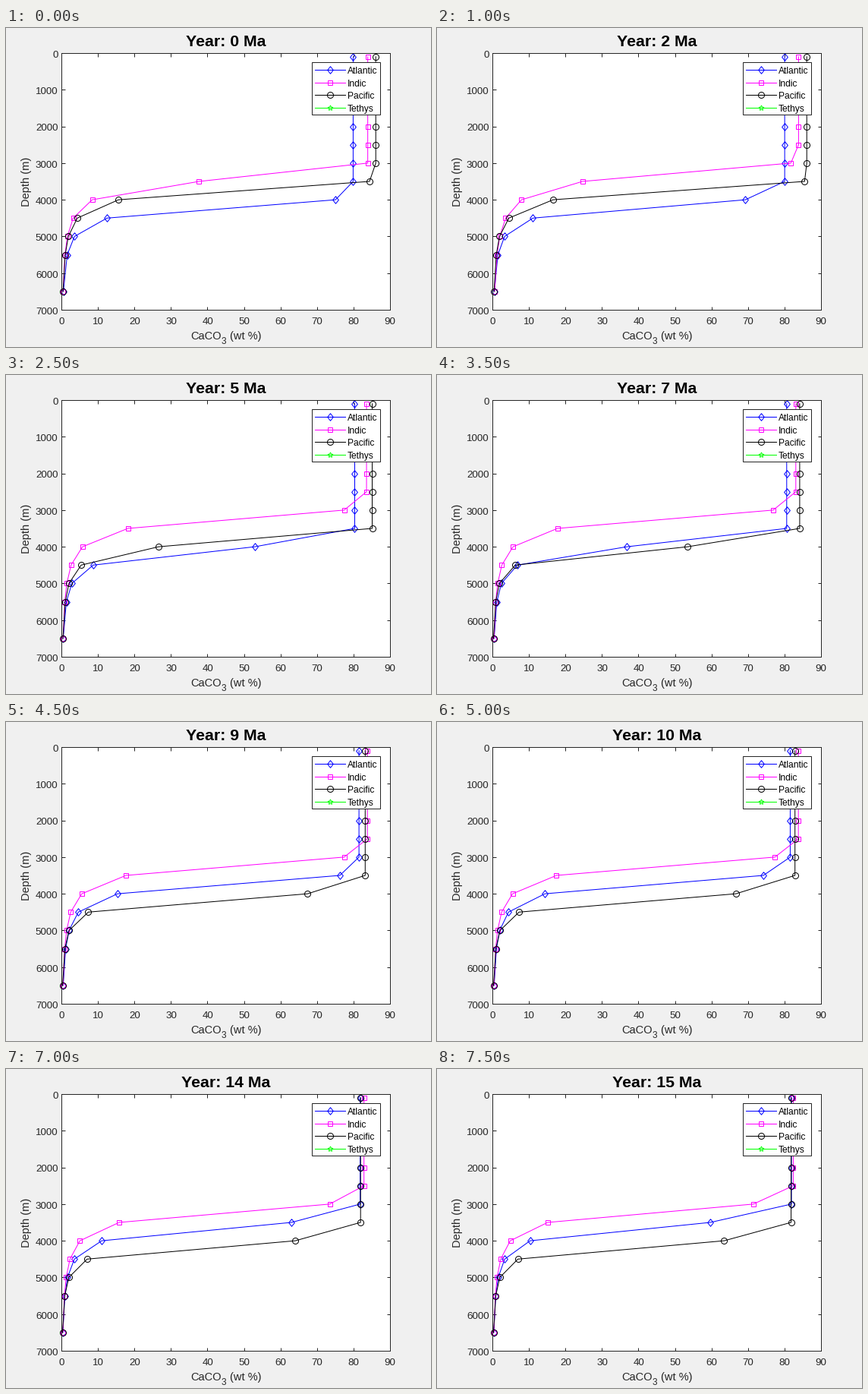
A matplotlib script that plays this animation: 560 px wide and 420 px high, repeating every 8 s.

```python
import numpy as np
import matplotlib.pyplot as plt
from matplotlib.animation import FuncAnimation
from matplotlib.lines import Line2D
from matplotlib.patches import Rectangle
from matplotlib.transforms import Affine2D

W, H, DPI = 560, 420, 100
PX = 72 / DPI                       # one pixel in points
LEFT, RIGHT, TOP, BOTTOM = 73, 506, 33, 371
INK = "#262626"
DIAMOND = [(0, 1), (0.8, 0), (0, -1), (-0.8, 0), (0, 1)]

plt.rcParams["font.family"] = "Liberation Sans"

DEPTH = np.array([100, *range(2000, 5501, 500), 6500])

# Each basin has three tracks of {year: value}, linear in between:
# shelf content (wt %), depth where dissolution sets in (m), its depth scale (m)
ATLANTIC = dict(
    shelf={0: 79.9, 4: 80.2, 7: 80.6, 9: 81.5, 15: 81.9},
    onset={0: 3923, 4: 3847, 7: 3710, 9: 3410, 15: 3320},
    scale={0: 268, 7: 268, 9: 304, 15: 282},
)
INDIC = dict(
    shelf={0: 83.9, 4: 83.8, 7: 83.1, 9: 83.8, 12: 83.8, 15: 82.4},
    onset={0: 3160, 2: 2927, 4: 2893, 12: 2893, 15: 2862},
    scale={0: 310, 2: 385, 4: 341, 15: 324},
)
PACIFIC = dict(
    shelf={0: 86.1, 2: 86.1, 4: 85.6, 9: 83.2, 12: 82.2, 15: 81.8},
    onset={0: 3453, 2: 3471, 4: 3536, 7: 3836, 9: 3891, 15: 3880},
    scale={0: 276, 4: 276, 7: 211, 15: 211},
)

# name, colour, marker, marker size in pixels, tracks
SERIES = [
    ("Atlantic", "#0000ff", DIAMOND, 9.6, ATLANTIC),
    ("Indic", "#ff00ff", "s", 6, INDIC),
    ("Pacific", "#000000", "o", 8, PACIFIC),
    ("Tethys", "#00ff00", (5, 1, 0), 7, None),
]


def profile(tracks, year):
    """Carbonate content: constant on the shelf, power-law decay below the onset."""
    shelf, onset, scale = (np.interp(year, list(tracks[k]), list(tracks[k].values()))
                           for k in ("shelf", "onset", "scale"))
    below = np.maximum(DEPTH - onset, 0) / scale
    return shelf / (1 + below ** 2.2)


fig = plt.figure(figsize=(W / DPI, H / DPI), dpi=DPI, facecolor="#f0f0f0")
pixels = Affine2D().scale(1 / W, -1 / H).translate(0, 1) + fig.transFigure


def label(x, y, s, size, ha="center", color=INK, **kw):
    return fig.text(x, y, s, transform=pixels, fontsize=size * PX, ha=ha,
                    va="baseline", color=color, **kw)


def style(color, marker, size):
    return dict(color=color, lw=PX, marker=marker, ms=size * PX, mew=PX,
                mfc="none", mec=color)


ax = fig.add_axes([LEFT / W, 1 - BOTTOM / H, (RIGHT - LEFT) / W, (BOTTOM - TOP) / H])
ax.set(xlim=(0, 90), ylim=(7000, 0), xticks=range(0, 91, 10),
       yticks=range(0, 7001, 1000))
ax.tick_params(direction="in", length=4.5 * PX, width=PX, color=INK, top=True,
               right=True, labelbottom=False, labelleft=False)
for spine in ax.spines.values():
    spine.set(linewidth=PX, edgecolor=INK)

for v in range(0, 91, 10):
    label(LEFT + 0.3 + v * (RIGHT - LEFT) / 90, 390, str(v), 13.33)
for v in range(0, 7001, 1000):
    label(68.5, TOP + 5.8 + v * (BOTTOM - TOP) / 7000, str(v), 13.33, "right")

label(284, 410, "CaCO", 14.67, "right")
label(284, 416.5, "3", 11.73, "left")
label(294.6, 410, "(wt %)", 14.67, "left")
label(30.5, 202, "Depth (m)", 14.67, rotation=90, rotation_mode="anchor")
title = label(289.5, 24, "", 21.33, color="black", weight="bold")

# Legend
fig.add_artist(Rectangle((403, 45), 90, 69, transform=pixels, fc="white",
                         ec=INK, lw=PX, zorder=1))
curves = []
for k, (name, color, marker, size, tracks) in enumerate(SERIES):
    y = 55 + 16.6 * k
    look = style(color, marker, size)
    fig.add_artist(Line2D([407, 447], [y, y], transform=pixels, **{**look, "marker": ""}))
    fig.add_artist(Line2D([427], [y], transform=pixels, **look))
    label(450, y + 5, name, 12, "left", "black")
    if tracks:
        line, = ax.plot([], [], clip_on=False, **look)
        curves.append((line, tracks))


def draw(year):
    title.set_text(f"Year: {year} Ma")
    for line, tracks in curves:
        line.set_data(profile(tracks, year), DEPTH)
    return [title] + [line for line, _ in curves]


anim = FuncAnimation(fig, draw, frames=16, interval=500, repeat=True,
                     repeat_delay=0, blit=False)
plt.show()
```
